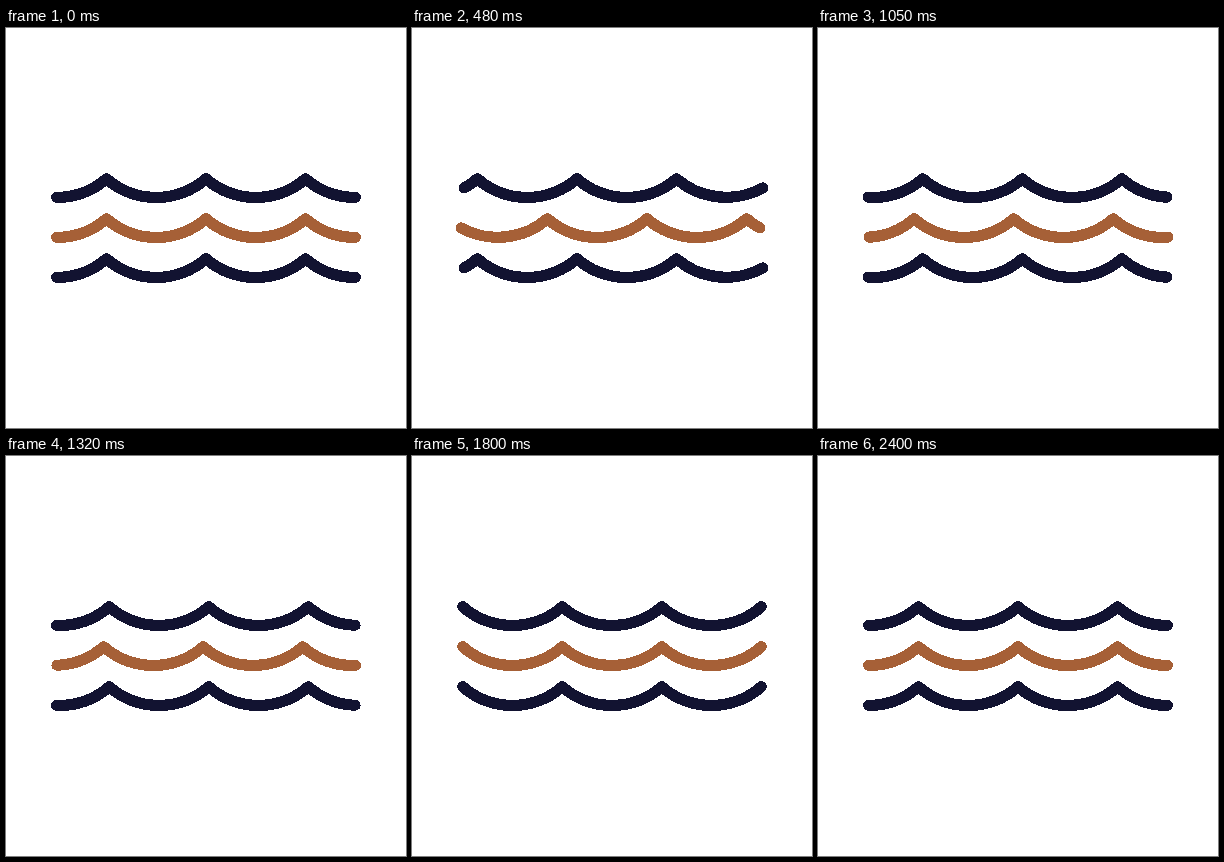
An HTML page with a canvas for the animation above (2960 ms loop, 400x400 px).

```html
<!DOCTYPE html>
<html lang="en">
<head>
<meta charset="utf-8">
<title>Waves</title>
<style>
  html, body { margin: 0; width: 100%; height: 100%; overflow: hidden; background: #fff; }
  canvas { display: block; width: 400px; height: 400px; }
</style>
</head>
<body>
<canvas id="stage" width="400" height="400"></canvas>
<script>
const SIZE = 400, UNITS = 430;
const ctx = document.getElementById('stage').getContext('2d', { willReadFrequently: true });

const LOOP = 2960, SWING = 1200, STEP = 30;
const PERIOD = 107, COUNT = 3, DEPTH = 20, WEIGHT = 12;
const LEFT = (UNITS - PERIOD * COUNT) / 2;
const RADIUS = ((PERIOD / 2) ** 2 + DEPTH ** 2) / (2 * DEPTH);
const SPAN = 2 * Math.asin(PERIOD / 2 / RADIUS);

const NAVY = '#121331', RUST = '#a66037';
const ROWS = [
  { crest: 162, color: NAVY, dir: 1 },
  { crest: 205, color: RUST, dir: -1 },
  { crest: 248, color: NAVY, dir: 1 },
];

const smooth = p => p * p * (3 - 2 * p);

// Sweeps one period to the side and back, then rests.
function shiftAt(ms) {
  const t = Math.min(Math.floor(ms % LOOP / STEP) * STEP, 2 * SWING);
  return smooth(1 - Math.abs(t / SWING - 1));
}

// The row is cut by arc length, so its ends drift slightly as it travels.
function drawRow({ crest, color, dir }, shift) {
  const start = shift * dir, end = start + COUNT;
  const cy = crest + DEPTH - RADIUS;
  const angle = a => Math.PI / 2 - a * SPAN;
  ctx.strokeStyle = color;
  ctx.beginPath();
  for (let n = Math.round(start); n <= Math.round(end); n++) {
    const from = Math.max(start - n, -0.5);
    const to = Math.min(end - n, 0.5);
    if (to < from) continue;
    ctx.arc(LEFT + PERIOD * (n - start), cy, RADIUS, angle(from), angle(to), true);
  }
  ctx.stroke();
}

// Every pixel is either fully inked or empty.
function hardenEdges() {
  const image = ctx.getImageData(0, 0, SIZE, SIZE);
  const { data } = image;
  for (let i = 3; i < data.length; i += 4) data[i] = data[i] < 128 ? 0 : 255;
  ctx.putImageData(image, 0, 0);
}

ctx.scale(SIZE / UNITS, SIZE / UNITS);
ctx.lineWidth = WEIGHT;
ctx.lineCap = ctx.lineJoin = 'round';

function frame() {
  const shift = shiftAt(performance.now());
  ctx.clearRect(0, 0, UNITS, UNITS);
  for (const row of ROWS) drawRow(row, shift);
  hardenEdges();
  requestAnimationFrame(frame);
}
frame();
</script>
</body>
</html>
```
